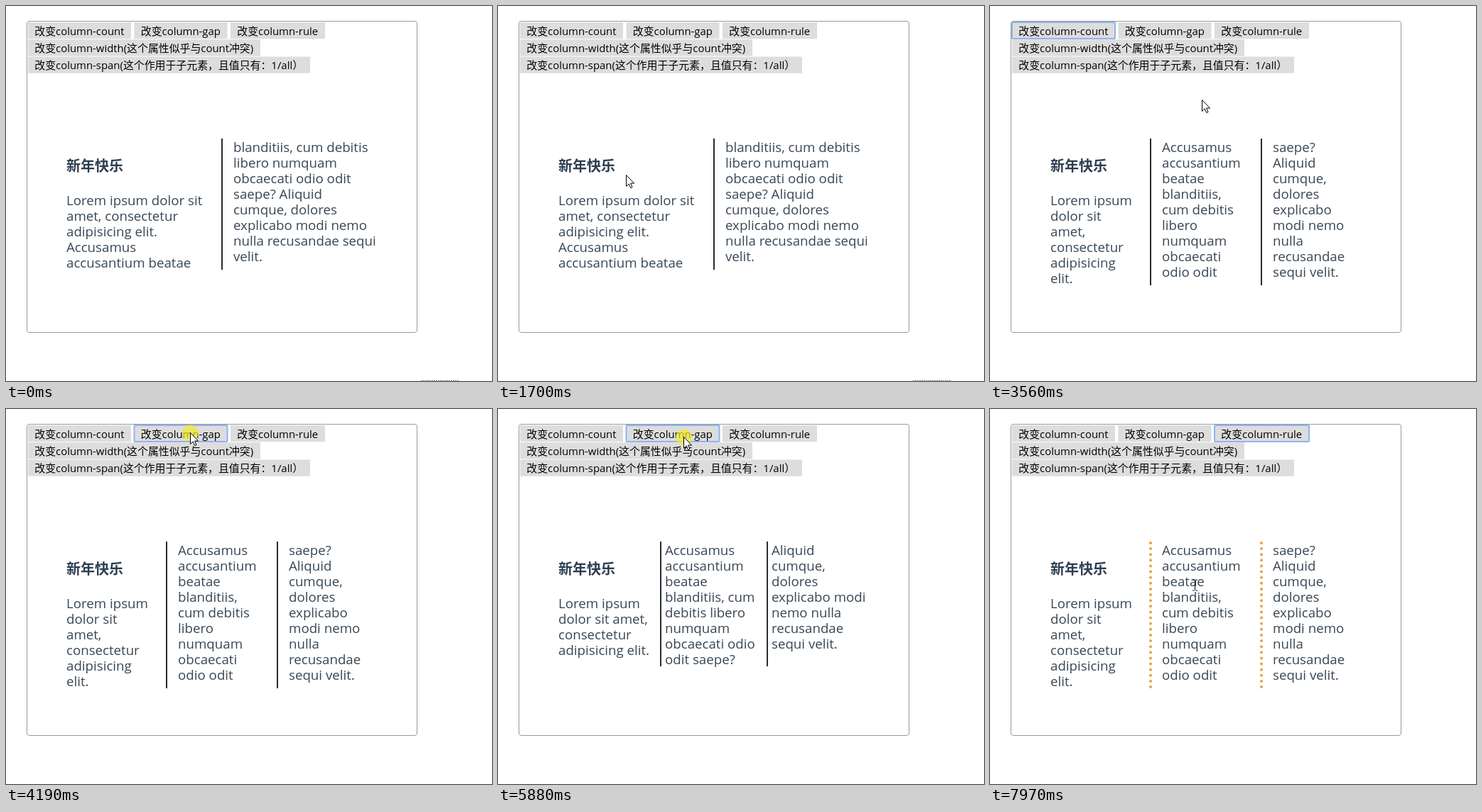
An HTML page that plays this animation: 684 px wide and 529 px high, repeating every 8 s.

```html
<!DOCTYPE html>
<html lang="zh-CN">
<head>
<meta charset="utf-8">
<title>CSS columns</title>
<style>
  html, body { margin: 0; width: 100%; height: 100%; overflow: hidden; background: #fff; }
  svg { display: block; width: 684px; height: 529px; cursor: default; }
  text { font-family: "Open Sans", "Noto Sans CJK SC", "Noto Sans CJK", sans-serif; white-space: pre; }
  .button { font-size: 14.9px; fill: #000; }
  .copy { font-size: 18.7px; fill: #384756; }
  .title { font-family: "Noto Sans CJK SC", "Noto Sans CJK", sans-serif; font-size: 20px; font-weight: 700; fill: #2c3e50; }
</style>
</head>
<body>
<svg id="stage" viewBox="0 0 684 529"></svg>
<script>
const LOOP = 8000, TICK = 77;
const stage = document.getElementById('stage');

function add(parent, tag, attrs = {}, text) {
  const el = document.createElementNS('http://www.w3.org/2000/svg', tag);
  for (const key in attrs) el.setAttribute(key, attrs[key]);
  if (text) el.textContent = text;
  return parent.appendChild(el);
}
const show = (el, on) => el.setAttribute('visibility', on ? 'visible' : 'hidden');

// Panel
add(stage, 'rect', { x: 29.5, y: 21.5, width: 549, height: 439, rx: 3.5, fill: 'none', stroke: '#999' });
const linkEdge = add(stage, 'path', { d: 'M584 528.5H637', stroke: '#777', 'stroke-dasharray': '2 1' });

// Buttons flow along each row and fit their labels
const labels = [
  ['改变column-count', '改变column-gap', '改变column-rule'],
  ['改变column-width(这个属性似乎与count冲突)'],
  ['改变column-span(这个作用于子元素，且值只有：1/all）']
];
const rings = labels.flatMap((row, i) => {
  const y = 23 + 24.25 * i;
  let x = 31;
  return row.map(label => {
    const box = add(stage, 'rect', { x, y, height: 23.3, fill: '#ddd' });
    const text = add(stage, 'text', { x: x + 9.3, y: y + 17.8, class: 'button' }, label);
    const width = Math.round(text.getComputedTextLength() + 18.8);
    box.setAttribute('width', width);
    const ring = add(stage, 'rect', { x, y, width, height: 23, rx: 1, fill: 'none', stroke: '#8db4f2', 'stroke-width': 2 });
    x += width + 4.5;
    return ring;
  });
});

// Multi-column article
const LEFT = 85, WIDTH = 439, TOP = 187, LINE = 22, PARA = 262;

function buildLayout(gap, ...columns) {
  const group = add(stage, 'g');
  const solid = add(group, 'g', { stroke: '#2b2b2b', 'stroke-width': 2 });
  const dotted = add(group, 'g', { stroke: '#e6a23c', 'stroke-width': 4, 'stroke-linecap': 'round', 'stroke-dasharray': '0 8.12' });
  const parts = columns.map(column => column.split('|'));
  const bottom = Math.max(PARA + parts[0].length * LINE, TOP + parts[1].length * LINE);
  const lines = [];
  parts.forEach((rows, i) => {
    const left = LEFT + i * (WIDTH + gap) / parts.length;
    if (i) {
      const rule = Math.floor(left - gap / 2);
      add(solid, 'path', { d: `M${rule} ${TOP}V${bottom}` });
      add(dotted, 'path', { d: `M${rule} ${TOP + 2}V${bottom - 1.9}` });
    }
    rows.forEach((row, j) => {
      const x = Math.ceil(left), y = (i ? TOP : PARA) + j * LINE;
      const el = add(group, 'text', { x, y: y + 19, class: 'copy' }, row);
      lines.push({ x, y, width: el.getComputedTextLength() });
    });
  });
  return { group, solid, dotted, lines };
}

const layouts = {
  two: buildLayout(30,
    'Lorem ipsum dolor sit|amet, consectetur|adipisicing elit.|Accusamus|accusantium beatae',
    'blanditiis, cum debitis|libero numquam|obcaecati odio odit|saepe? Aliquid|cumque, dolores|explicabo modi nemo|nulla recusandae sequi|velit.'),
  three: buildLayout(30,
    'Lorem ipsum|dolor sit|amet,|consectetur|adipisicing|elit.',
    'Accusamus|accusantium|beatae|blanditiis,|cum debitis|libero|numquam|obcaecati|odio odit',
    'saepe?|Aliquid|cumque,|dolores|explicabo|modi nemo|nulla|recusandae|sequi velit.'),
  tight: buildLayout(10,
    'Lorem ipsum|dolor sit amet,|consectetur|adipisicing elit.',
    'Accusamus|accusantium|beatae|blanditiis, cum|debitis libero|numquam|obcaecati odio|odit saepe?',
    'Aliquid|cumque,|dolores|explicabo modi|nemo nulla|recusandae|sequi velit.')
};
add(stage, 'text', { x: LEFT, y: 232.5, class: 'title' }, '新年快乐');

// Pointer
const pointer = add(stage, 'g');
const halo = add(pointer, 'circle', { cx: .5, cy: 1, r: 11.5, fill: '#f2e92a', 'fill-opacity': .7 });
const arrow = add(pointer, 'path', {
  d: 'M.5 .5V16.5L4.2 13 6.7 18.6 9 17.6 6.6 12.1H11.6Z', fill: '#fff', stroke: '#000'
});
const beam = add(pointer, 'path', {
  d: 'M-3.5-7.5H-1M1-7.5H3.5M0-7V7M-3.5 7.5H-1M1 7.5H3.5', fill: 'none', stroke: '#000', transform: 'translate(-.5 .5)'
});

// Pointer strokes: first and last step time, goal, and a control point where the path bends
const ENTRY = [496, 510];
const strokes = [
  { from: 370, to: 990, goal: [104, 66] },
  { from: 1160, to: 1700, goal: [180, 238], bend: [498, 462] },
  { from: 1780, to: 1930, goal: [305, 132] },
  { from: 2000, to: 2230, goal: [109, 37] },
  { from: 2870, to: 3560, goal: [298, 132], bend: [713, 441] },
  { from: 3640, to: 3870, goal: [259, 33] },
  { from: 4570, to: 5030, goal: [199, 207], bend: [210, 661] },
  { from: 5110, to: 5650, goal: [261, 39] },
  { from: 6420, to: 6730, goal: [366, 38], bend: [315, 0] },
  { from: 6800, to: 7040, goal: [410, 38], bend: [395, 50] },
  { from: 7900, to: 7970, goal: [289, 248] }
];

function pointerAt(t) {
  const i = strokes.filter(s => t >= s.from).length - 1;
  if (i < 0) return null;
  const { from, to, goal, bend } = strokes[i];
  const start = i ? strokes[i - 1].goal : ENTRY;
  const count = Math.round((to - from) / TICK) + 1;
  const u = Math.min(1, (Math.floor((t - from + 8) / TICK) + 1) / count);
  return goal.map((g, k) => {
    const mid = bend ? bend[k] : (start[k] + g) / 2;
    return Math.round((1 - u) ** 2 * start[k] + 2 * u * (1 - u) * mid + u * u * g);
  });
}

// A press sets focus and halo; its release changes the layout
const clicks = [
  { down: 2550, up: 2640, button: 0, layout: 'three' },
  { down: 4190, up: 4340, button: 1, layout: 'tight' },
  { down: 5880, up: 5950, button: 1, layout: 'three' },
  { down: 7650, up: 7730, button: 2, layout: 'three', dots: true }
];

function draw(t) {
  const pressed = clicks.filter(c => t >= c.down).pop();
  const done = clicks.filter(c => t >= c.up).pop() || { layout: 'two' };
  show(linkEdge, !pressed);
  rings.forEach((ring, i) => show(ring, pressed && pressed.button === i));
  for (const name in layouts) {
    const { group, solid, dotted } = layouts[name], on = name === done.layout;
    show(group, on);
    show(solid, on && !done.dots);
    show(dotted, on && done.dots);
  }
  const pos = pointerAt(t);
  const [x, y] = pos || [0, 0];
  const overText = layouts[done.layout].lines.some(l => x >= l.x && x <= l.x + l.width && y >= l.y && y < l.y + LINE);
  pointer.setAttribute('transform', `translate(${x} ${y})`);
  show(halo, pos && pressed && pressed !== done);
  show(arrow, pos && !overText);
  show(beam, pos && overText);
}

const began = performance.now();
function tick() {
  draw((performance.now() - began) % LOOP);
  requestAnimationFrame(tick);
}
tick();
</script>
</body>
</html>
```
